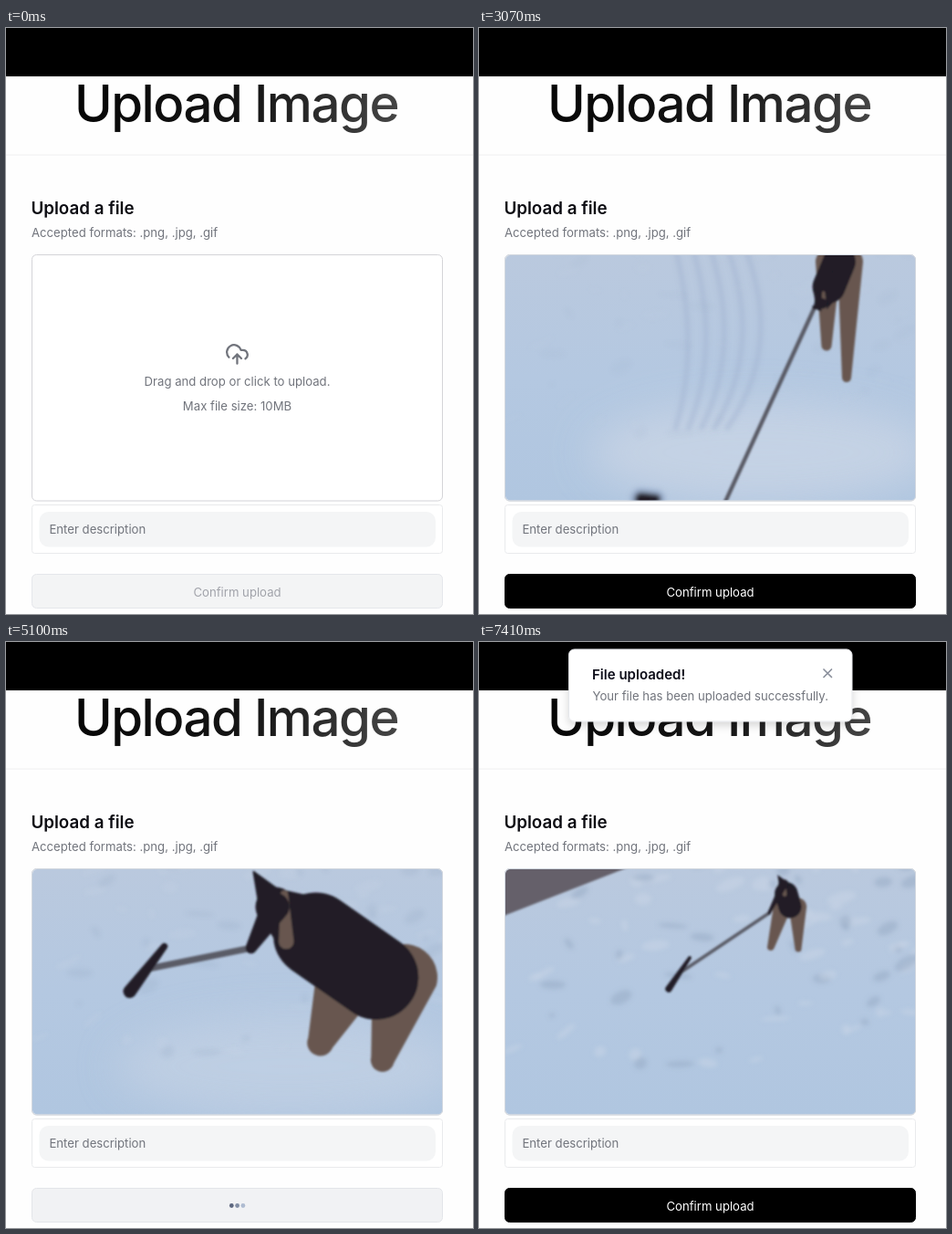
Animation, 512 px wide and 642 px high, one loop 7480 ms. Source, as an HTML page:

```html
<!DOCTYPE html>
<html lang="en">
<head>
<meta charset="utf-8">
<title>Upload Image</title>
<style>
  html, body { margin: 0; width: 100%; height: 100%; overflow: hidden; background: #fefefe; }
  svg { display: block; width: 100vw; height: 100vh; }
  text { font-family: Inter, sans-serif; font-size: 13.16px; font-optical-sizing: none; fill: #71747c; }
  #title { font-size: 56.4px; font-weight: 500; letter-spacing: -.026em; fill: url(#ink); }
  #heading { font-size: 18.8px; font-weight: 600; fill: #0c0c12; }
  #done { font-size: 15.04px; font-weight: 600; fill: #0c0c18; }
  #copy { font: 12px 'Noto Sans CJK KR', 'Noto Sans CJK', sans-serif; fill: #27324e; }
</style>
</head>
<body>
<svg viewBox="0 0 512 642" preserveAspectRatio="xMidYMin meet">
  <defs>
    <linearGradient id="ink" gradientUnits="userSpaceOnUse" x1="77" y1="50" x2="431" y2="120">
      <stop offset="0" stop-color="#050505"/><stop offset=".55" stop-color="#161616"/><stop offset="1" stop-color="#474747"/>
    </linearGradient>
    <linearGradient id="snow" x1="0" y1="0" x2="0" y2="1">
      <stop offset="0" stop-color="#bac9de"/><stop offset=".5" stop-color="#b4c8e1"/><stop offset="1" stop-color="#b0c6e0"/>
    </linearGradient>
    <clipPath id="frame"><rect x="29" y="249" width="449.5" height="268.5" rx="5"/></clipPath>
    <filter id="soft"><feGaussianBlur stdDeviation="1.1"/></filter>
    <filter id="haze"><feGaussianBlur stdDeviation="2.5"/></filter>
    <filter id="glow" x="-50%" y="-50%" width="200%" height="200%"><feGaussianBlur stdDeviation="22"/></filter>
    <filter id="lift" x="-10%" y="-20%" width="120%" height="160%">
      <feDropShadow dx="0" dy="4" stdDeviation="5" flood-opacity=".16"/>
    </filter>
    <path id="arrow" d="M0 0V13l3-2.8 2.2 4.8 2-1-2.2-4.6h4.2z" fill="#fff" stroke="#111"/>
  </defs>

  <rect width="512" height="642" fill="#fefefe"/>
  <rect width="512" height="53"/>
  <text id="title" x="74.9" y="103">Upload Image</text>
  <path d="M0 139h512" stroke="#f0f0f1"/>
  <text id="heading" x="27.4" y="204">Upload a file</text>
  <text x="28" y="229">Accepted formats: .png, .jpg, .gif</text>

  <rect id="zone" x="28.5" y="248.5" width="450" height="269.5" rx="5" fill="#fff" stroke="#d4d4d8"/>
  <rect id="target" x="29.5" y="249.5" width="448.5" height="267.5" rx="5" fill="none" stroke="#08080c" stroke-width="2"/>
  <path d="M4 14.9A7 7 0 1 1 15.7 8h1.8a4.5 4.5 0 0 1 2.5 8.24M12 12v9M16 16l-4-4-4 4" transform="translate(239.9 343.9) scale(1.13)"
    fill="none" stroke="#71747c" stroke-width="2" stroke-linecap="round" stroke-linejoin="round"/>
  <text x="253.5" y="392" text-anchor="middle">Drag and drop or click to upload.</text>
  <text x="253.5" y="418.5" text-anchor="middle">Max file size: 10MB</text>

  <g id="photo">
    <g clip-path="url(#frame)">
      <rect x="28" y="248" width="452" height="271" fill="url(#snow)"/>
      <ellipse id="drift" cx="310" cy="465" rx="190" ry="55" fill="#c8d4e5" filter="url(#glow)"/>
      <g id="tracks" fill="none" stroke="#9fb2cf" stroke-width="5" filter="url(#haze)"></g>
      <g id="lumps" filter="url(#haze)"></g>
      <g id="fence" filter="url(#soft)"></g>
      <g id="dog" filter="url(#soft)"></g>
    </g>
    <rect x="28.5" y="248.5" width="450" height="269.5" rx="5" fill="none" stroke="#d0d6de"/>
  </g>

  <rect x="28.5" y="522.5" width="450" height="53" rx="3" fill="#fff" stroke="#e9eaec"/>
  <rect x="36.5" y="530" width="434.5" height="38.5" rx="10" fill="#f4f5f6"/>
  <text x="47.4" y="554.4">Enter description</text>

  <rect id="button" x="28.5" y="598.5" width="450" height="37" rx="5"/>
  <text id="label" x="253.5" y="622.5" text-anchor="middle">Confirm upload</text>
  <g id="dots"></g>

  <g id="ghost">
    <rect x="-46.5" y="-84.5" width="95" height="94" rx="2" fill="#fff" stroke="#55555c"/>
    <rect x="-42" y="-63" width="84" height="67" opacity=".14"/>
    <rect x="-42" y="-63" width="83" height="65" fill="#b7c9e0"/>
    <path d="M-42-63H41v6L-8-55-42-38z" fill="#8c8d94"/>
    <g id="thumb" transform="translate(-72 -124) scale(.25)"></g>
    <rect x="11.5" y="12.5" width="47" height="18" rx="2" fill="#fbfbfc" stroke="#e3e4e7"/>
    <path d="M16 21.5h11M21.5 16v11" stroke="#33394a" stroke-width="1.2"/>
    <text id="copy" x="30" y="25.5">복사</text>
    <use href="#arrow"/>
  </g>
  <g id="pointer">
    <use id="plain" href="#arrow"/>
    <path id="hand" d="M0 1.5c0-2 3-2 3 0v5q3-2 5.500 1 3-1 3 1.500v4l-1.500 4.500h-7.500q-1-3-5-8c0-2 1.500-2 2.500 0z" fill="#fff" stroke="#222"/>
  </g>

  <g id="toast">
    <rect x="98.500" y="8" width="310.500" height="79" rx="6" fill="#fff" stroke="#e5e7eb" filter="url(#lift)"/>
    <text id="done" x="124" y="41">File uploaded!</text>
    <text x="124.500" y="64">Your file has been uploaded successfully.</text>
    <path d="M378 30l8.500 8.500m0-8.500l-8.500 8.500" stroke="#8b909c" stroke-width="1.700" stroke-linecap="round"/>
  </g>
</svg>
<script>
const LOOP = 7480, STEP = 70, PHASE = 60;
const DRAG = 970, DROP = 2510, ENTER = 4050, HOVER = 4530, CLICK = 4960, DONE = 6230, READY = 6285, TOAST = 6400;
const DARK = '#201e26', BROWN = '#67564f', GREY = '#5a5b66';

const $ = id => document.getElementById(id);
const show = (id, on) => $(id).setAttribute('display', on ? 'inline' : 'none');
const move = (id, x, y) => $(id).setAttribute('transform', `translate(${x} ${y})`);
const fade = (id, v) => $(id).setAttribute('opacity', v);
const clamp = p => Math.max(0, Math.min(1, p));
const ease = p => 1 - Math.pow(1 - clamp(p), 1.7);
const times = (n, fn) => Array.from({ length: n }, (_, i) => fn(i)).join('');

// Blends numbers, arrays and objects of the same form
function lerp(a, b, p) {
  if (typeof a === 'number') return a + (b - a) * p;
  if (Array.isArray(a)) return a.map((v, i) => lerp(v, b[i], p));
  return Object.fromEntries(Object.keys(a).map(k => [k, lerp(a[k], b[k], p)]));
}

// Value at time t between keys of the form [time, value]
function at(keys, t) {
  let i = 0;
  while (i < keys.length - 2 && t >= keys[i + 1][0]) i++;
  const [t0, a] = keys[i], [t1, b] = keys[i + 1];
  return lerp(a, b, clamp((t - t0) / (t1 - t0)));
}

// Tapered shape with a round end at each point
function limb([x0, y0], r0, [x1, y1], r1, fill) {
  const angle = Math.atan2(y1 - y0, x1 - x0);
  const nx = Math.sin(angle), ny = -Math.cos(angle);
  return `<path fill="${fill}" d="M${x0 + nx * r0} ${y0 + ny * r0}L${x1 + nx * r1} ${y1 + ny * r1}
    A${r1} ${r1} 0 0 1 ${x1 - nx * r1} ${y1 - ny * r1}L${x0 - nx * r0} ${y0 - ny * r0}
    A${r0} ${r0} 0 0 1 ${x0 + nx * r0} ${y0 + ny * r0}z"/>`;
}

// All widths follow the girth; the joints give the pose
function dog({ girth: g, hip, head, left, right, grip, heel, toe }) {
  const from = ([x, y], dx, dy) => [x + dx * g, y + dy * g];
  const chest = lerp(head, hip, 0.4), cheek = lerp(head, hip, 0.09);
  const thin = Math.sqrt(g) / 2;
  return limb(grip, thin, lerp(heel, toe, 0.5), thin, GREY) +
    limb(heel, thin, toe, thin * 2, DARK) +
    limb(from(hip, -0.6, 0), g * 0.7, left, g * 0.28, BROWN) +
    limb(from(hip, 0.6, 0), g * 0.7, right, g * 0.25, BROWN) +
    limb(chest, g * 0.9, hip, g * 0.9, DARK) +
    limb(head, g * 0.42, chest, g * 0.85, DARK) +
    limb(from(head, -0.46, -0.74), g * 0.02, head, g * 0.38, DARK) +
    limb(from(cheek, 0, -0.4), g * 0.08, from(cheek, 0.04, 0.6), g * 0.16, BROWN) +
    limb(head, g * 0.3, grip, g * 0.12, DARK);
}

const leash = { girth: 20, hip: [395, 256], head: [376, 302], left: [381, 348], right: [403, 383],
  grip: [368, 306], heel: [290, 530], toe: [240, 530], fence: 200, lumps: 0.15, tracks: 1 };
const tug = { girth: 84, hip: [520, 385], head: [334, 330], left: [398, 446], right: [500, 430],
  grip: [286, 375], heel: [110, 334], toe: [70, 426], fence: 200, lumps: 0, tracks: 0 };
const away = { girth: 24, hip: [308, 352], head: [262, 256], left: [299, 433], right: [338, 482],
  grip: [254, 301], heel: [228, 333], toe: [192, 346], fence: 242, lumps: 0.8, tracks: 0 };
const side = { girth: 16, hip: [357, 312], head: [331, 285], left: [347, 368], right: [371, 342],
  grip: [322, 308], heel: [254, 367], toe: [239, 382], fence: 290, lumps: 1, tracks: 0 };
const facing = { girth: 14, hip: [341, 290], head: [334, 266], left: [320, 334], right: [350, 336],
  grip: [318, 297], heel: [231, 346], toe: [208, 380], fence: 274, lumps: 1, tracks: 0 };
const poses = [[DROP, facing], [3070, leash], [4610, tug], [5520, away], [6290, side], [7410, facing]];

const dragPath = [[DRAG, [-72, 522]], [1600, [72, 451]], [1740, [96, 441]], [2440, [250, 390]]];
const clickPath = [[ENTER, [-10, 562]], [4400, [42, 597]], [4610, [62, 609]]];

// Button fill, border and text
const looks = {
  off: [[243, 244, 245], [229, 231, 235], [161, 163, 170]],
  on: [[0, 0, 0], [0, 0, 0], [255, 255, 255]],
  hover: [[255, 255, 255], [0, 0, 0], [0, 0, 0]],
  busy: [[241, 242, 244], [229, 231, 235], [161, 168, 180]]
};
const changes = [[DROP, 'off', 'on'], [HOVER, 'on', 'hover'], [CLICK, 'hover', 'busy'], [READY, 'busy', 'on']];

function build() {
  let seed = 77;
  const rnd = () => (seed = (seed * 16807) % 2147483647) / 2147483647;
  $('lumps').innerHTML = times(90, () => {
    const x = 29 + rnd() * 450, y = 240 + rnd() ** 1.6 * 230, tilt = -40 + rnd() * 50;
    const fill = rnd() < 0.45 ? '#92a6c2' : '#cdd8e7';
    return `<ellipse rx="${3 + rnd() * 14}" ry="${2 + rnd() * 5}" fill="${fill}" opacity=".45" transform="translate(${x} ${y}) rotate(${tilt})"/>`;
  });
  $('tracks').innerHTML = times(5, i => `<path opacity=".5" d="M${215 + i * 19} 240q${28 + i * 4} 110 ${-i * 5} 200"/>`) +
    limb([178, 516], 10, [194, 516], 8, DARK);
  $('fence').innerHTML = limb([20, 0], 27, [195, -48], 8, '#65616a');
  $('thumb').innerHTML = dog({ ...facing, girth: 22, heel: [318, 372], toe: [350, 366], grip: [326, 300] });
  $('dots').innerHTML = times(3, i => `<circle cx="${247.3 + i * 6.3}" cy="617.5" r="2.4"/>`);
}

function drawPhoto(t) {
  show('photo', t >= DROP);
  const pose = at(poses, t);
  $('dog').innerHTML = dog(pose);
  move('fence', 0, pose.fence);
  move('lumps', 0, (pose.fence - 290) / 4);
  fade('lumps', pose.lumps);
  fade('drift', 1 - pose.lumps);
  fade('tracks', pose.tracks);
}

function drawButton(t) {
  const rgb = c => `rgb(${c.map(Math.round)})`;
  const [start, from, to] = changes.filter(c => t >= c[0]).pop() || changes[0];
  const [fill, border, text] = lerp(looks[from], looks[to], ease((t - start) / 150)).map(rgb);
  $('button').setAttribute('fill', fill);
  $('button').setAttribute('stroke', border);
  $('label').style.fill = text;
  const busy = t >= CLICK && t < DONE;
  show('label', !busy);
  show('dots', busy);
  [...$('dots').children].forEach((dot, i) => {
    const wave = 0.5 + 0.5 * Math.cos((t - 5520) / 1000 * Math.PI * 2 - (i - 2) * 1.2);
    dot.setAttribute('fill', rgb(lerp([180, 194, 214], [92, 102, 126], wave)));
  });
}

function drawPointers(t) {
  const dragging = t >= DRAG && t < DROP, spot = at(dragPath, t);
  show('ghost', dragging);
  move('ghost', ...spot);
  show('target', dragging && spot[0] > 28);
  show('pointer', t >= ENTER && t < CLICK);
  show('hand', t >= HOVER);
  show('plain', t < HOVER);
  move('pointer', ...at(clickPath, t));
}

function drawToast(t) {
  show('toast', t >= TOAST);
  move('toast', 0, -95 * (1 - ease((t - TOAST) / 350)));
}

function tick() {
  const now = performance.now() % LOOP;
  const t = Math.max(0, Math.floor((now - PHASE) / STEP) * STEP + PHASE);
  for (const draw of [drawPhoto, drawButton, drawPointers, drawToast]) draw(t);
  requestAnimationFrame(tick);
}
build();
tick();
</script>
</body>
</html>
```
